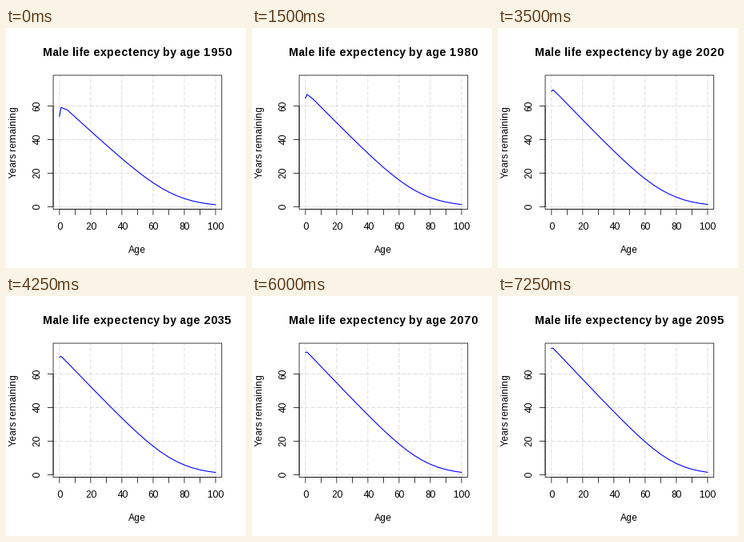
These frames come from a looping animation (300 px wide and 300 px high, 7500 ms). A matplotlib script:

```python
import matplotlib.pyplot as plt
import numpy as np
from matplotlib.animation import FuncAnimation
from matplotlib.patches import Rectangle

SIZE, DPI = 300, 72
STEPS, STEP_MS = 30, 250
LEFT, RIGHT, TOP, BOTTOM = 59.04, 269.76, 59.04, 226.56
TICK, THIN = 7.2, 0.75
AGES = np.concatenate([[0, 1], np.arange(5, 101, 5)])

# Whole-pixel letter advances
plt.rcParams.update({"font.family": "Liberation Sans",
                     "text.hinting_factor": 1})


def remaining(s):
    """Years remaining at each age; s runs from 0 (1950) to 1 (2095)."""
    late = s ** 2.4
    knee = 72.8 + 5 * late
    width = 12.8 - 1.4 * late
    slope = 0.943 + 0.039 * s - 0.093 * np.exp(-11 * s)
    adult = slope * width * np.log1p(np.exp((knee - AGES) / width))
    infant_loss = 7 * np.exp(-4 * s - 1.3 * AGES) + np.exp(-4 * AGES)
    return adult - infant_loss


def px(age):
    return LEFT + (RIGHT - LEFT) * (age + 4) / 108


def py(years):
    return 223.5 - 2.1 * years


fig = plt.figure(figsize=(SIZE / DPI, SIZE / DPI), dpi=DPI, facecolor="white")
ax = fig.add_axes([0, 0, 1, 1])
ax.set(xlim=(0, SIZE), ylim=(SIZE, 0))
ax.axis("off")


def rule(x0, y0, x1, y1, color="black", **style):
    ax.plot([x0, x1], [y0, y1], color=color, lw=THIN, snap=False,
            solid_capstyle="butt", dash_capstyle="butt", **style)


def label(x, y, text, size=12, **style):
    return ax.text(x, y, text, size=size, color="black", ha="center",
                   va="baseline", rotation_mode="anchor", **style)


dashes = dict(color="#d3d3d3", linestyle=(0, (7, 3)), zorder=1)

for age in range(0, 101, 10):
    x = px(age)
    rule(x, BOTTOM, x, BOTTOM + TICK)
    if age % 20 == 0:
        rule(x, BOTTOM, x, TOP, **dashes)
        label(x, 252, str(age))

for years in range(0, 61, 20):
    y = py(years)
    rule(LEFT - TICK, y, LEFT, y)
    rule(LEFT, y, RIGHT, y, **dashes)
    label(42, y, str(years), rotation=90)

# Axis lines lie over the box
rule(px(0), BOTTOM, px(100), BOTTOM)
rule(LEFT, py(0), LEFT, py(60))
ax.add_patch(Rectangle((LEFT, TOP), RIGHT - LEFT, BOTTOM - TOP, fill=False,
                       ec="black", lw=THIN, snap=False, zorder=3))

mid_x, mid_y = (LEFT + RIGHT) / 2, (TOP + BOTTOM) / 2
label(mid_x, 281, "Age")
label(13.5, mid_y, "Years remaining", rotation=90)
title = label(mid_x, 34.9, "", size=14.4, weight="bold")
line, = ax.plot([], [], color="#0000ff", lw=1.1, snap=False, zorder=2,
                solid_joinstyle="round")


def draw(step):
    title.set_text(f"Male life expectency by age {1950 + 5 * step}")
    line.set_data(px(AGES), py(remaining(step / (STEPS - 1))))
    return title, line


anim = FuncAnimation(fig, draw, frames=STEPS, interval=STEP_MS,
                     repeat=True, repeat_delay=0)
plt.show()
```
